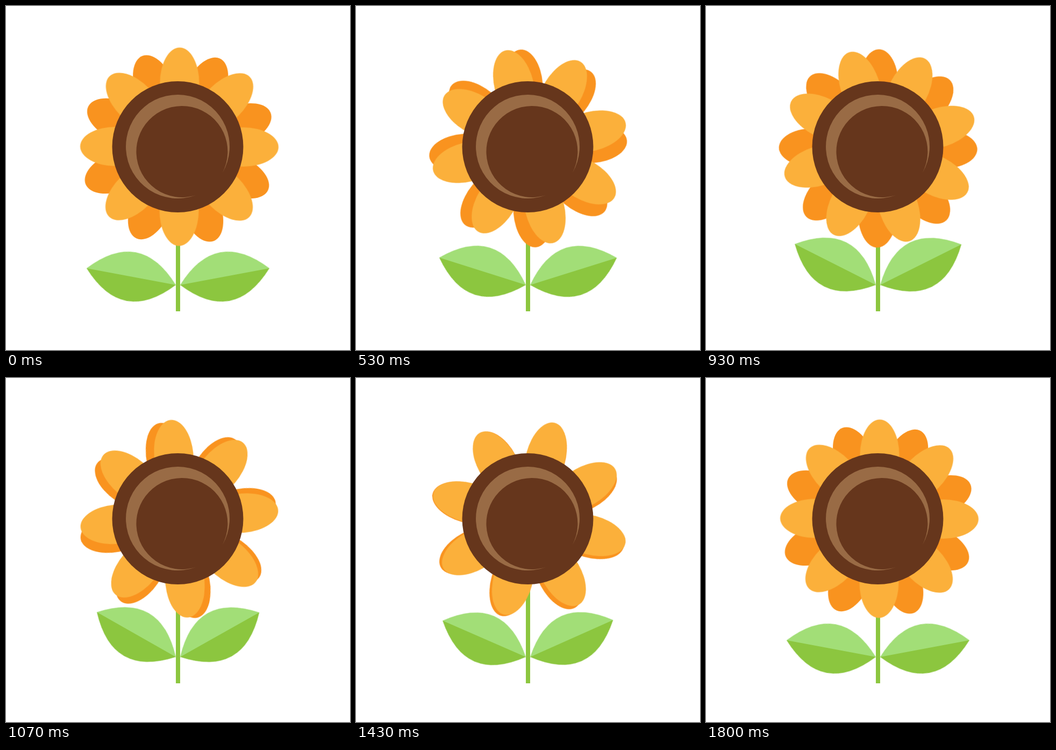
Animation of 640x640 px, one loop 1.83 s. Source, as an HTML page:

```html
<!DOCTYPE html>
<html lang="en">
<head>
<meta charset="utf-8">
<title>Sunflower</title>
<style>
  html, body { margin: 0; width: 100%; height: 100%; overflow: hidden; background: #fff; }
  svg { display: block; width: 100%; height: 100%; }
</style>
</head>
<body>
<svg viewBox="0 0 640 640">
  <defs>
    <g id="leaf" transform="rotate(-10.6)">
      <path d="M0 0Q84.5 92 169 0Z" fill="#8cc63f"/>
      <path d="M0 0Q84.5 -92 169 0Z" fill="#a2de77"/>
    </g>
    <ellipse id="petal" cy="-118.5" rx="36.5" ry="66"/>
  </defs>
  <rect x="316" y="300" width="8" height="268" fill="#8cc63f"/>
  <g transform="translate(324 519)"><g id="right"><use href="#leaf"/></g></g>
  <g transform="translate(316 519) scale(-1 1)"><g id="left"><use href="#leaf"/></g></g>
  <g transform="translate(320.2 265)"><g id="back" fill="#f9931f"></g></g>
  <g transform="translate(322.5 261.8)"><g id="front" fill="#fbb03b"></g></g>
  <circle cx="319.5" cy="262" r="122" fill="#66361c"/>
  <path d="M402.6 310.6A96.5 96.5 0 1 0 353 352A85 85 0 1 1 402.6 310.6Z" fill="#996b45"/>
</svg>
<script>
const LOOP = 1830, END = 1810;
const $ = id => document.getElementById(id);

// Eight evenly spaced petals, every other one leaning slightly apart
function ring(id, start, lean) {
  for (let i = 0; i < 8; i++) {
    const angle = start + 45 * i + (i % 2 ? -lean : lean);
    $(id).innerHTML += `<use href="#petal" transform="rotate(${angle})"/>`;
  }
}
ring('front', 0.2, 0);
ring('back', 24.45, 0.5);

// Turn slowly to the given angle, then swing back faster
function sway(id, angle, peak) {
  const rest = 'rotate(0deg)';
  $(id).animate([
    { offset: 0, transform: rest, easing: 'cubic-bezier(.36, 0, .82, 1)' },
    { offset: peak / LOOP, transform: `rotate(${angle}deg)`, easing: 'cubic-bezier(.36, 0, .64, 1)' },
    { offset: END / LOOP, transform: rest },
    { offset: 1, transform: rest }
  ], { duration: LOOP, iterations: Infinity });
}
sway('front', 90, 1185);
sway('back', -83.5, 1165);
sway('left', -20, 1175);
sway('right', -20, 1190);
</script>
</body>
</html>
```
